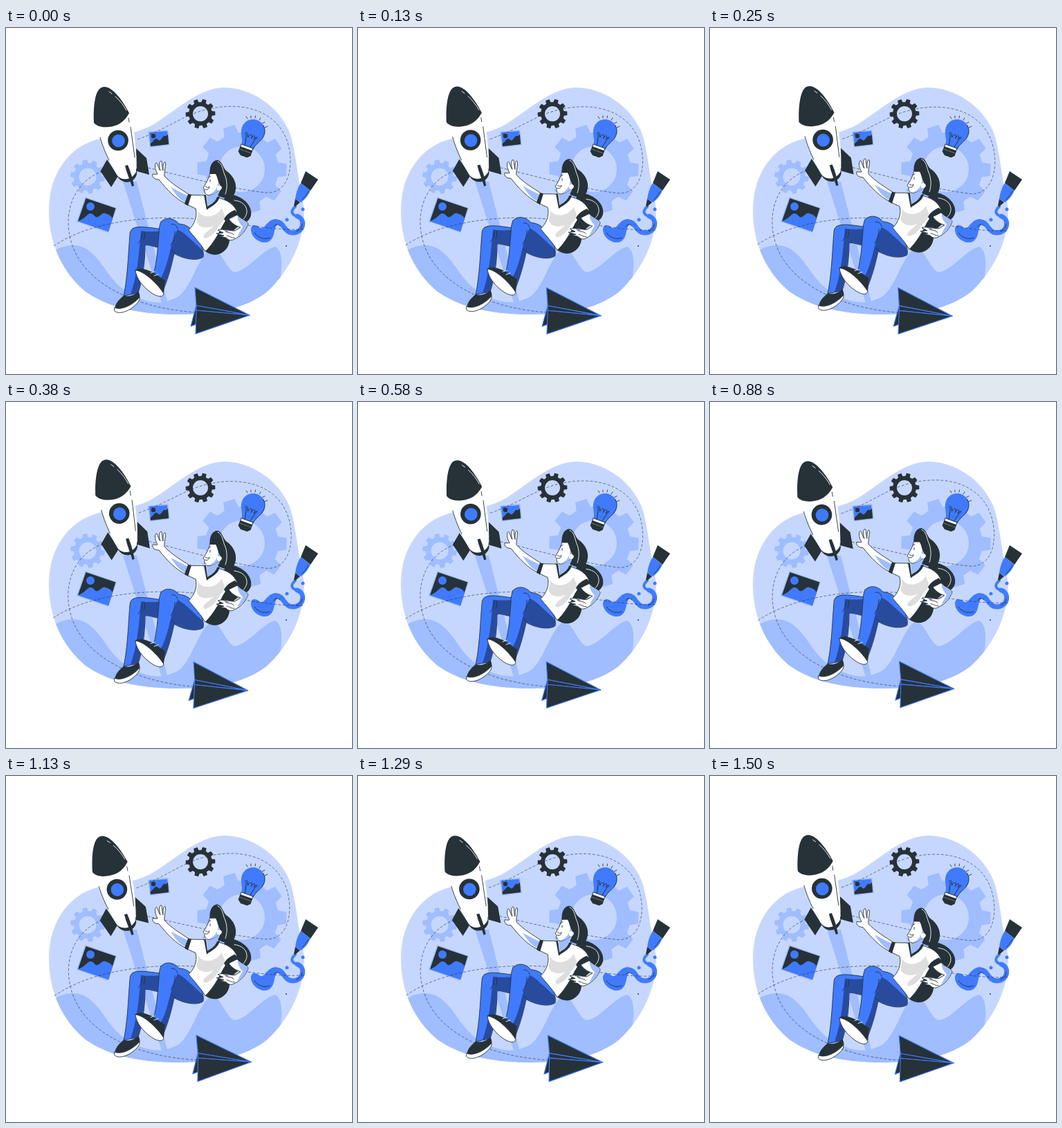
Animation of 500 by 500 pixels, one loop 1540 ms. Source, as an HTML page:

```html
<!DOCTYPE html>
<html lang="en">
<head>
<meta charset="utf-8">
<title>Launch</title>
<style>
html, body { margin: 0; width: 100%; height: 100%; overflow: hidden; background: #fff; }
svg { display: block; width: 100vw; height: 100vh; stroke-linecap: round; stroke-linejoin: round; fill: none; }
.light { fill: #c6d7ff; }
.mid { fill: #9fbdff; }
.blue { fill: #407bff; }
.navy { fill: #294b9e; }
.dark { fill: #263238; }
.white { fill: #fff; }
.grey { fill: #dedede; }
.ink { stroke: #263238; stroke-width: .9; }
.paint { stroke: #407bff; }
.shine { stroke: #fff; stroke-width: .9; }
.route { stroke: #263238; stroke-width: .6; stroke-dasharray: 4 2.4; stroke-linecap: butt; }
</style>
</head>
<body>
<svg viewBox="0 0 500 500">
  <defs>
    <path id="blob" d="M62 264C62 210 92 168 140 159C165 154 186 153 206 143C241 125 276 86 316 86C356 87 393 113 409 149C419 175 421 215 429 250C438 300 408 355 375 383C338 410 290 414 240 414C190 412 150 405 115 381C84 355 62 315 62 264Z"/>
    <clipPath id="inside"><use href="#blob"/></clipPath>
  </defs>
  <use href="#blob" class="light"/>
  <path class="mid" clip-path="url(#inside)" d="M60 330C78 312 104 309 120 322C140 337 148 362 170 378C190 392 218 403 240 392C267 388 276 327 298 317C310 319 320 352 331 353C350 350 372 319 389 316C400 322 400 342 395 372L330 430H80Z"/>
  <path class="mid" d="M169 222H189L234 399L226 400Z"/>
  <g id="gears"></g>

  <g id="pictures">
    <path class="mid" d="M205 150L234 147L237 169L208 173Z"/>
    <path class="blue" d="M207 151L233 149L235 168L209 171Z"/>
    <circle class="dark" cx="213" cy="156" r="3.2"/>
    <path class="dark" d="M209 171L208.500 167C212 166 214 160 217 160C220 160 220 164 223 162C226 160 227 155 230 156C232 157 232 155 234 154L235 168Z"/>
    <path class="mid" d="M114.500 244L160 260L148 296L102 280Z"/>
    <path class="dark" d="M115.500 246L158.500 260.500L148 294L104 279Z"/>
    <circle class="blue" cx="122" cy="258" r="6"/>
    <path class="blue" d="M104 279C116 275 117 268 122 268C128 268 128 275 133 273C138 270 140 266 144 268C148 270 150 269 154 275L148 294Z"/>
  </g>

  <g id="bulb">
    <path class="ink" d="M349 131L347 128M354 130V127M360 130L360.500 127M366 133L368 130M370 138L374 136M374 144L378 142"/>
    <g transform="translate(357 149) rotate(20)">
      <path class="blue" d="M-17 0A17 17 0 1 1 17 0C17 10 10 14 9 24H-9C-10 14 -17 10 -17 0Z"/>
      <path class="ink" d="M-4 23L-7 9C-11 7 -9 3 -6 6L-4 11C-3 4 2 4 1 11C2 4 7 4 5 11C8 4 11 6 7 10L4 23"/>
      <path class="ink" d="M11 -13A17 17 0 0 1 17 0C17 10 10 14 9 24"/>
      <path class="dark" d="M-10 23H9V35L5 39H-5L-10 35Z"/>
      <path class="white" d="M-9 24H8V27H-9Z"/>
      <path class="shine" stroke-opacity=".35" d="M-9 31H8"/>
    </g>
  </g>

  <g id="brush">
    <path class="paint" stroke-width="4" d="M418 258C410 265 413 270 421 272"/>
    <path class="paint" stroke-width="7" d="M421 272C433 276 431 295 415 296C401 296 402 280 391 280"/>
    <path class="blue" d="M354 291C354 284 361 283 366 288C374 294 376 276 391 276L396 283C385 284 391 299 382 307C374 315 354 306 354 291Z"/>
    <path class="ink" d="M359 296C365 304 374 306 381 303M420 294C425 292 428 288 428 284M387 287C389 283 393 283 396 286"/>
    <path class="dark" d="M433 207L451 219L440 235L426 224Z"/>
    <path class="blue" d="M426 224L440 235C436 243 432 248 426 252L418 247C419 238 422 230 426 224Z"/>
    <path class="ink" d="M437 236C434 241 431 245 428 248"/>
    <path class="dark" d="M418 247L425 252L418 258L416 257Z"/>
    <circle class="blue" cx="406" cy="277" r="2.500"/>
    <circle class="blue" cx="429" cy="262" r="2.500"/>
    <circle class="dark" cx="405" cy="315" r=".9"/>
  </g>

  <g id="flight">
    <path class="route" d="M190 161C230 147 255 127 285 119C350 101 411 125 411 194C410 224 396 239 376 238C320 232 245 211 188 198"/>
    <path class="route" d="M146 205C109 215 90 246 90 282C92 365 184 405 275 411"/>
    <path class="route" d="M69 315C114 284 190 271 262 275C330 279 376 293 430 291"/>

    <g id="rocket">
      <path class="dark" d="M146 190L136.500 207L152 230L162 214ZM188 174L203 188L207 212L189 207Z"/>
      <path class="dark" d="M157 208L162 216C170 227 186 224 189 211V203Z"/>
      <path class="white" d="M130 139L180 121C185 150 190 178 188 208C181 221 166 221 160 212C147 190 136 165 130 139Z"/>
      <path class="dark" d="M127 137C126 116 128 90 138 86C151 80 169 105 178 123C171 136 161 142 148 143C139 144 131 142 127 137Z"/>
      <path class="shine" d="M149 92L153 95M158 99C165 105 170 112 174 119"/>
      <path class="ink" d="M136 158C140 172 145 183 149 191M177 130L178 136M180 143L186 187"/>
      <circle class="dark" cx="162" cy="162.500" r="14.800"/>
      <circle class="blue" cx="162.500" cy="163" r="9.300"/>
      <path class="dark" d="M172 199L176 198C180 207 183 217 185 228L182 229C179 219 174 209 172 199Z"/>
    </g>

    <g id="plane" stroke="#407bff" stroke-width="1.100">
      <path class="dark" d="M275 401L267 431L275 428L283 408Z"/>
      <path class="dark" d="M273 375L352 415L275 401Z"/>
      <path class="dark" d="M275 401L352 415L275 408Z"/>
      <path class="dark" d="M275 408L352 415L274 442Z"/>
    </g>
  </g>

  <g id="woman">
    <path class="dark" d="M318 240C339 240 357 255 354 271C350 286 332 281 323 302C325 322 304 336 287 322L305 275Z"/>
    <path class="shine" d="M330 249C341 250 349 257 348 267C347 272 344 276 341 278"/>

    <g class="ink">
      <path class="blue" d="M183 290C190 284 215 290 228 291L232 317C220 320 207 312 201 314C201 340 197 365 191 383L170 387C176 360 177 320 179 299C179 295 180 292 183 290Z"/>
      <path class="navy" stroke="none" d="M195 293C207 295 220 294 228 293L226 317C215 317 207 312 201 314C200 340 196 364 191 382L180 385C190 356 192 327 195 293Z"/>
      <path d="M191 311C195 307 197 302 197 296M199 306C201 302 201 299 200 295"/>
      <path class="dark" d="M158 403C160 395 167 390 170 387C178 390 186 386 191 381C195 388 193 395 184 401C174 410 163 411 158 408Z"/>
      <path class="white" d="M157 404C166 409 184 400 193 389C194 395 187 401 180 406C170 412 161 413 157 409Z"/>
      <path class="blue" d="M224 280C232 272 243 275 250 283C260 284 267 288 272 297C280 307 287 320 285 331C275 338 255 333 243 326C240 340 236 357 228 377L210 365C218 345 219 320 221 297C221 290 222 284 224 280Z"/>
      <path class="navy" stroke="none" d="M248 291C259 296 270 309 284 321C287 327 285 331 282 333C267 336 253 331 243 325C240 342 235 358 228 375L219 369C236 345 235 316 248 291Z"/>
      <path d="M244 294C244 302 242 308 238 314M239 321L245 326M248 290C247 285 242 282 239 284"/>
    </g>
    <path class="dark" d="M187 350C190 346 201 347 214 354L230 365C228 372 230 382 226 386C211 371 199 359 187 350Z"/>
    <path class="white ink" d="M187 350C200 351 220 371 228 384C226 391 216 387 209 382C198 374 188 362 187 350Z"/>
    <path class="shine" d="M209 354L215 352M214 358L220 356"/>

    <g id="reach" class="ink">
      <path class="white" d="M260 254C246 248 232 233 221 219C215 219 211 216 212 211C215 211 217 212 219 211C216 206 214 198 217 195C219 194 220 203 223 206C221 200 221 193 224 192C226 192 225 201 227 206C227 200 227 193 230 194C232 196 228 209 229 214C239 225 253 233 265 241Z"/>
      <path class="mid" stroke="none" d="M238 230C246 234 254 238 263 243L259 252C251 248 245 241 238 230Z"/>
    </g>

    <path class="white ink" d="M264 241C272 242 281 241 288 242L304 245C320 248 330 255 334 266C323 270 317 278 312 288C304 304 296 315 288 323C281 311 271 301 264 292C272 284 277 273 274 261L259 254Z"/>
    <path class="grey" d="M277 264C284 276 303 275 312 260C314 269 318 270 315 277C306 286 302 302 287 304C281 300 292 294 300 286C289 291 279 288 276 281C275 274 279 271 277 264Z"/>
    <path class="dark" d="M263 240L268 241L263 257L258 254ZM331 263L335 268C327 271 322 275 318 281L315 276C319 269 325 265 331 263Z"/>

    <g class="ink">
      <path class="white" d="M322 276L334 270C337 275 348 278 350 283C347 292 340 301 330 305C324 309 320 305 318 303L309 301L315 300L304 297L314 296L306 292C316 289 324 294 331 293L339 288C332 286 326 282 322 276Z"/>
      <path class="mid" stroke="none" d="M335 271C338 276 347 278 349 283C347 291 341 298 334 302C338 294 340 291 342 287C338 283 334 277 335 271Z"/>
      <path d="M317 294C322 297 327 295 329 299M319 300C324 301 326 304 330 303M313 291L321 294"/>
    </g>

    <path class="white" d="M287 240L305 237C307 242 306 247 303 250C297 256 293 258 290 261Z"/>
    <path class="mid" d="M290 241C299 240 302 235 306 233C307 244 304 251 296 254L291 258Z"/>
    <path class="dark" d="M286 241L289 241L291 258C297 254 303 251 305 244L309 243C307 254 297 257 290 263Z"/>
    <path class="white ink" d="M295 208C294 217 289 224 285 231C286 233 288 233 287 235C287 240 291 243 296 241C302 239 308 236 310 229L309 209Z"/>
    <path class="mid" d="M307 221L311 220L308 233C304 239 298 241 293 241C301 238 306 231 307 221Z"/>
    <path class="ink" d="M288 229C291 231 293 231 294 229C294 232 291 235 288 233M293 216L296 214M295 219V222"/>
    <path class="dark" d="M295 211C293 200 299 190 306 191C313 193 313 202 319 207C331 215 336 230 329 242C324 249 314 246 306 242C309 237 311 232 309 226C306 222 306 216 303 211Z"/>
    <path class="white" d="M305 229C309 225 314 230 311 233C309 236 306 235 305 233Z"/>
    <path class="shine" d="M306 193C313 196 313 205 316 212C320 221 320 232 317 240"/>
  </g>
</svg>
<script>
const LOOP = 1540;
const find = id => document.getElementById(id);

function gear(x, y, outer, body, hole, teeth, turn, tone) {
  const step = 2 * Math.PI / teeth;
  const corners = [[-.32, body], [-.21, outer], [.21, outer], [.32, body]];
  let rim = '';
  for (let i = 0; i < teeth; i++)
    for (const [offset, radius] of corners) {
      const angle = turn * Math.PI / 180 + (i + offset) * step;
      rim += `${rim ? 'L' : 'M'}${x + radius * Math.cos(angle)} ${y + radius * Math.sin(angle)}`;
    }
  const ring = `M${x - hole} ${y}a${hole} ${hole} 0 1 0 ${2 * hole} 0a${hole} ${hole} 0 1 0 ${-2 * hole} 0Z`;
  return `<path class="${tone}" fill-rule="evenodd" d="${rim}Z${ring}"/>`;
}

find('gears').innerHTML =
  gear(341, 204, 65, 53, 33, 10, 1, 'mid') +
  gear(118, 215, 25, 20, 12.5, 10, 8, 'mid') +
  gear(281, 124, 21.5, 17, 11, 10, -2, 'dark');

// Straight up and down between 0 and 1, peaking halfway through the loop.
const triangle = time => 1 - Math.abs(1 - 2 * (time % 1));

function draw() {
  const time = performance.now() / LOOP;
  const sway = 2 * triangle(time + .25) - 1;
  find('flight').setAttribute('transform', `rotate(${sway} 243 263)`);
  find('woman').setAttribute('transform', `translate(0 ${-10 * triangle(time)})`);
  requestAnimationFrame(draw);
}
draw();
</script>
</body>
</html>
```
